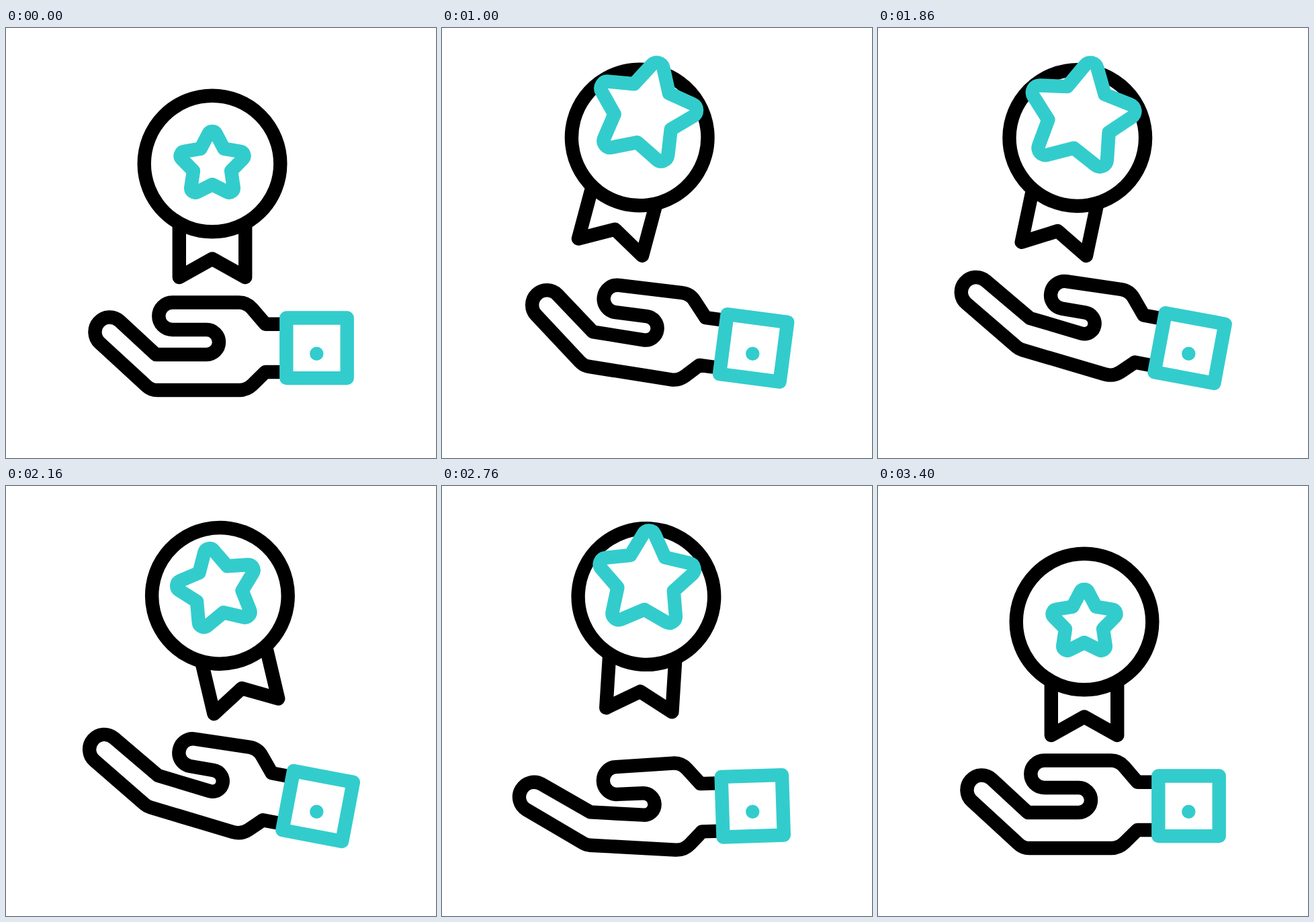
Recreate the animation shown at these times as an HTML page. Size 640 by 640 pixels, loop 3.6 s.

```html
<!DOCTYPE html>
<html lang="en">
<head>
<meta charset="utf-8">
<title>Award in hand</title>
<style>
  html, body { margin: 0; width: 100%; height: 100%; overflow: hidden; background: #fff; }
  svg { display: block; width: 100vw; height: 100vh; }
  .line { fill: none; stroke: #000; stroke-width: 20.4; stroke-linecap: round; stroke-linejoin: round; }
  .filled { fill: #fff; }
  .accent { fill: #fff; stroke: #3cc; }
</style>
</head>
<body>
<svg viewBox="0 0 640 640">
  <g id="arm">
    <path id="hand" class="line"/>
    <rect class="line accent" x="417.3" y="431.5" width="90.4" height="89.6"/>
  </g>
  <circle cx="462.3" cy="484.8" r="10.2" fill="#3cc"/>
  <g id="medal">
    <path class="line" d="M257.8 294V371L307 343.5L356.2 371V294"/>
    <circle class="line filled" cx="307" cy="202" r="101.3"/>
    <path id="star" class="line accent"/>
  </g>
</svg>
<script>
const LOOP = 3600, STEP = 20, START = 200, END = 3400;
const $ = id => document.getElementById(id);

const clamp = x => Math.min(1, Math.max(0, x));
const smooth = x => x * x * (3 - 2 * x);

// cubic-bezier(1/6, 0, 5/6, 1)
function ease(x) {
  let lo = 0, hi = 1;
  for (let i = 0; i < 24; i++) {
    const u = (lo + hi) / 2, v = 1 - u;
    if (0.5 * u * v * v + 2.5 * u * u * v + u ** 3 < x) lo = u; else hi = u;
  }
  return smooth(lo);
}

const ramp = (t, from, to, curve = ease) => curve(clamp((t - from) / (to - from)));

// The medal swings to alternate sides, one side per beat
function swing(t) {
  const beat = 400, last = (END - START) / beat;
  const n = Math.min(last, Math.max(0, (t - START) / beat)), i = Math.floor(n);
  const side = k => k <= 0 || k >= last ? 0 : k % 2 ? -15 : 15;
  return side(i) + (side(i + 1) - side(i)) * ease(n - i);
}

// The hand rocks between a few turning points: [time, angle]
const turns = [[START, 0], [790, 15], [1380, -8], [2010, 15], [2630, -6.5], [2980, 7], [END, 0]];
const tilt = t => turns.slice(1).reduce(
  (sum, [time, angle], i) => sum + (angle - turns[i][1]) * ramp(t, turns[i][0], time), 0);

// Polyline through [x, y, radius] corners, each rounded as far as its sides allow
function rounded(points, closed) {
  const n = points.length;
  const parts = points.map((p, i) => {
    const [x, y, r = 0] = p;
    if (!r || (!closed && (i === 0 || i === n - 1))) return `${x} ${y}`;
    const sides = [points[(i + n - 1) % n], points[(i + 1) % n]].map(q => {
      const dx = q[0] - x, dy = q[1] - y, length = Math.hypot(dx, dy);
      return { dx: dx / length, dy: dy / length, length };
    });
    const [a, b] = sides;
    const slope = Math.tan(Math.acos(a.dx * b.dx + a.dy * b.dy) / 2);
    const cut = Math.min(r / slope, a.length / 2, b.length / 2), radius = cut * slope;
    const sweep = a.dx * b.dy - a.dy * b.dx < 0 ? 1 : 0;
    return `${x + a.dx * cut} ${y + a.dy * cut}A${radius} ${radius} 0 0 ${sweep} ${x + b.dx * cut} ${y + b.dy * cut}`;
  });
  return 'M' + parts.join('L') + (closed ? 'Z' : '');
}

function starPath(cx, cy, size) {
  const corners = Array.from({ length: 10 }, (_, k) => {
    const a = k * Math.PI / 5, r = size * (k % 2 ? 29.5 : 57);
    return [cx + r * Math.sin(a), cy - r * Math.cos(a), k % 2 ? 0 : 6.5 * size];
  });
  return rounded(corners, true);
}

// Corners at rest, each with its shift when the fingers are stretched
function handPath(stretch) {
  const p = (x, y, r = 0, dx = 0, dy = 0) => [x + dx * stretch, y + dy * stretch, r];
  return rounded([
    p(410, 440.7), p(386, 440.7),
    p(358.5, 408.5, 26),
    p(227.3, 408.5, 20.2, 17, 4.5), p(227.3, 449, 20.2, 17, 4.5),
    p(317, 449, 18.5, 0, 3.5), p(317, 486, 18.5),
    p(223, 486, 0, -2.5, -10),
    p(153.1, 421.4, 22, -26.7, 1), p(123.4, 453.9, 22, -19, 6.7),
    p(216, 539, 23, -3, -15),
    p(358.5, 539, 28),
    p(386, 512), p(410, 512)
  ]);
}

function draw(t) {
  const lift = 37.3 * (ramp(t, START, 600, smooth) - ramp(t, 3000, END, smooth));
  const grow = ramp(t, 600, 1100) - ramp(t, 1840, 2360) + ramp(t, 2460, 2880) - ramp(t, 2880, END);
  const hop = ramp(t, 600, 1100) - ramp(t, 1100, 1840);
  const stretch = ramp(t, 830, 1400) - ramp(t, 2600, 3350);

  $('medal').setAttribute('transform', `translate(0 ${-lift}) rotate(${swing(t)} 307 152.5)`);
  $('star').setAttribute('d', starPath(307 - 2 * grow, 203.5 - 34.5 * grow - 12 * hop, 1 + 0.65 * grow));
  $('arm').setAttribute('transform', `rotate(${tilt(t)} 462.3 484.8)`);
  $('hand').setAttribute('d', handPath(stretch));
}

const start = performance.now();
function tick() {
  const t = (performance.now() - start) % LOOP;
  draw(Math.floor(t / STEP) * STEP);
  requestAnimationFrame(tick);
}
tick();
</script>
</body>
</html>
```
